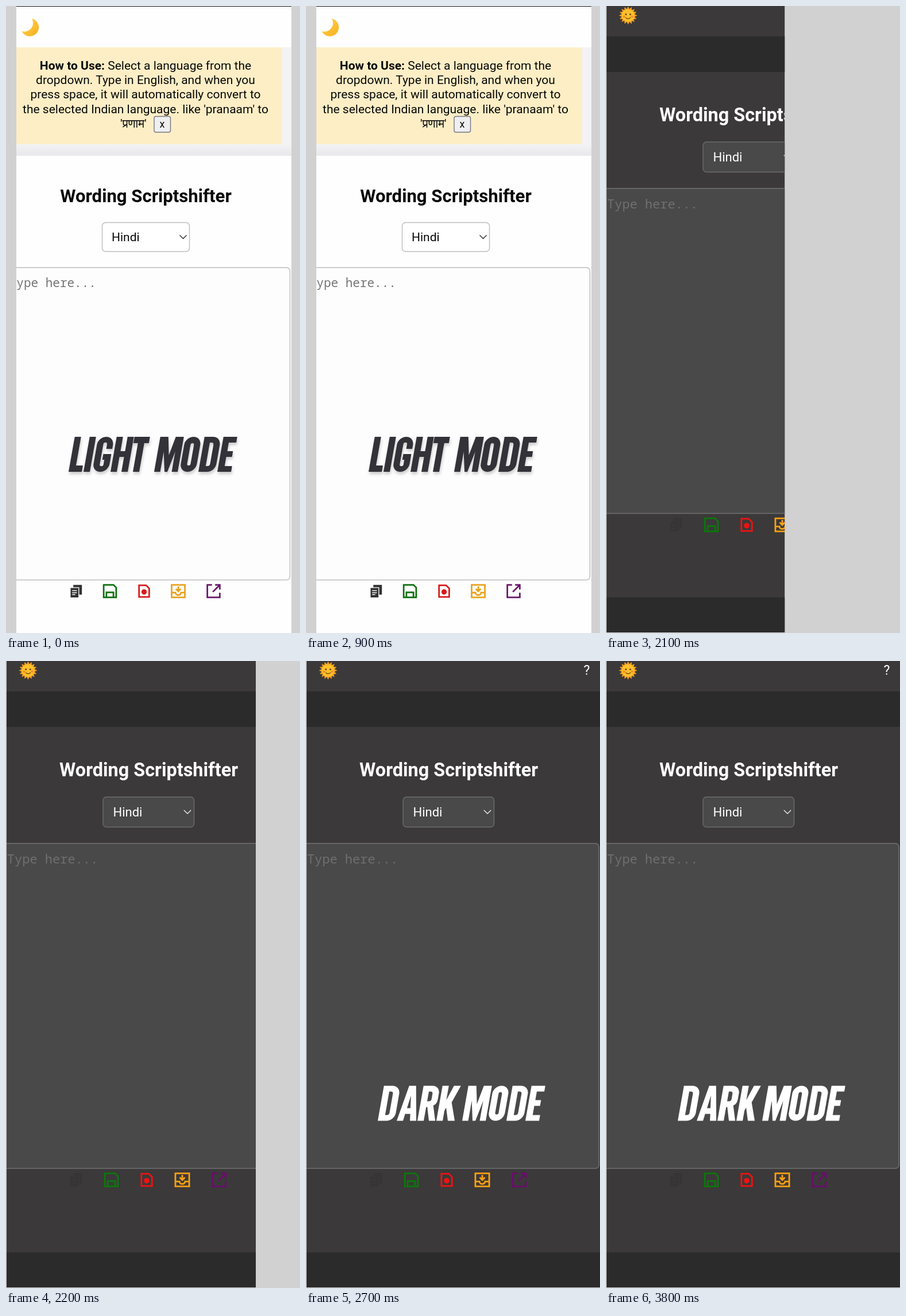
Write an HTML page that moves like this. It is 512 px wide and 1093 px high and loops after 4 s.

```html
<!DOCTYPE html>
<html lang="en">
<head>
<meta charset="utf-8">
<title>Light and dark mode</title>
<style>
html, body { margin: 0; width: 100%; height: 100%; overflow: hidden; background: #d1d1d1; }
svg { display: block; width: 100%; height: 100%; }
text { font-family: Roboto, "Noto Sans", sans-serif; }
.mono { font-family: "Noto Sans Mono", "DejaVu Sans Mono", monospace; }
.mid { text-anchor: middle; }
.bold { font-weight: 700; }
.line { fill: none; stroke: currentColor; stroke-width: 2; }
.arrow { fill: none; stroke-width: 1.3; }
</style>
</head>
<body>
<svg viewBox="0 0 512 1093" preserveAspectRatio="none">
<defs>
  <clipPath id="page"><rect x="18" width="479" height="1093"/></clipPath>
  <clipPath id="wipe"><rect id="wipeBox" height="1093"/></clipPath>
  <clipPath id="reveal"><rect id="revealBox" x="124" y="730" height="90"/></clipPath>
  <linearGradient id="fade" x2="0" y2="1">
    <stop stop-color="#f3f3f5"/><stop offset="1" stop-color="#e8e8ea"/>
  </linearGradient>
  <linearGradient id="gold" x2="1" y2="1">
    <stop stop-color="#ffd34d"/><stop offset="1" stop-color="#f9b021"/>
  </linearGradient>
  <filter id="soft" x="-10%" y="-20%" width="120%" height="150%">
    <feDropShadow dx="1" dy="4" stdDeviation="2.5" flood-color="#000" flood-opacity=".2"/>
  </filter>
  <g id="copy">
    <path d="M8.5 4H19.5V16.5H8.5z" fill="currentColor"/>
    <path d="M4.5 7.5H15.5V20.5H4.5z" fill="currentColor" stroke="var(--bg)"/>
    <path d="M7 11.5H13M7 14H13M7 16.5H11" stroke="var(--bg)" stroke-width="1.1"/>
  </g>
  <path id="save" class="line" d="M4 4H16.5L20 7.5V20H4zM7.5 20V13.5H16.5V20"/>
  <g id="file">
    <path class="line" d="M14.5 4.5H5.5V19.5H18.5V8.5z"/>
    <circle cx="12" cy="13" r="3.4" fill="currentColor"/>
  </g>
  <path id="inbox" class="line" d="M3.5 4H20.5V20H3.5zM3.5 14H8.5a3.5 3 0 0 0 7 0H20.5M12 6V12M8.8 9L12 12.2 15.2 9"/>
  <path id="open" class="line" d="M10 4H4V20H20V14M14 4H20V10M20 4L11 13"/>
</defs>

<rect width="512" height="1093" fill="#d1d1d1"/>

<g id="light" clip-path="url(#page)" style="--bg:#fefefe">
  <rect x="18" width="479" height="1093" fill="#fefefe"/>
  <rect x="18" width="479" height="1" fill="#111"/>
  <path d="M45 22A15.6 15.6 0 1 1 27.5 44A15 15 0 0 0 45 22z" fill="url(#gold)"/>
  <rect x="18" y="72" width="479" height="189" fill="#f3f3f5"/>
  <rect x="18" y="241" width="479" height="20" fill="url(#fade)"/>
  <rect x="18" y="72" width="463" height="169" fill="#fdeec6"/>
  <g font-size="21" fill="#080808">
    <g class="mid">
      <text x="243" y="111"><tspan class="bold">How to Use:</tspan> Select a language from the</text>
      <text x="243" y="136">dropdown. Type in English, and when you</text>
      <text x="243" y="161">press space, it will automatically convert to</text>
      <text x="243" y="186.500">the selected Indian language. like 'pranaam' to</text>
    </g>
    <text x="199" y="212">'प्रणाम'</text>
    <rect x="258" y="192.500" width="28.500" height="27.500" rx="3" fill="#efeff1" stroke="#777780" stroke-width="1.4"/>
    <text class="mid" x="272" y="212" font-size="18">x</text>
    <text class="mid bold" x="243.500" y="342" font-size="31.100">Wording Scriptshifter</text>
    <rect x="167.500" y="377.500" width="152" height="50.500" rx="6" fill="#fff" stroke="#bdbdbd" stroke-width="1.4"/>
    <text x="184" y="410">Hindi</text>
    <path class="arrow" d="M302.500 399.500L308.500 405.500 314.500 399.500" stroke="#222"/>
    <rect x="2" y="456" width="492.500" height="544.500" rx="6" fill="#fdfdfd" stroke="#bdbdbd" stroke-width="1.4"/>
    <text class="mono" x="5.700" y="490" fill="#757575">Type here...</text>
  </g>
</g>

<g id="dark" clip-path="url(#wipe)" style="--bg:#3b3939">
  <rect x="1" width="511" height="1092" fill="#3b3939"/>
  <path d="M1 53H512V115H1zM1 1031H512V1092H1z" fill="#2b2b2b"/>
  <g transform="translate(38.500 16.500)">
    <path id="rays" fill="#f8a01c"/>
    <circle r="10.800" fill="#ffc02b"/>
    <g fill="#6b4310"><circle cx="-3.800" cy="-2" r="1.500"/><circle cx="3.800" cy="-2" r="1.500"/></g>
    <path d="M-4.500 3.500Q0 8 4.500 3.500" fill="none" stroke="#8a5312" stroke-width="1.500"/>
    <g fill="#f58a2a"><circle cx="-7" cy="2" r="2"/><circle cx="7" cy="2" r="2"/></g>
  </g>
  <g font-size="22" fill="#fff">
    <text class="mid" x="489" y="24" font-size="23">?</text>
    <text class="mid bold" x="248.500" y="201" font-size="32.400">Wording Scriptshifter</text>
    <rect x="169" y="237" width="158.500" height="52.500" rx="6" fill="#494949" stroke="#6c6c6c" stroke-width="1.400"/>
    <text x="186.500" y="271">Hindi</text>
    <path class="arrow" d="M309.800 260L316 266 322.200 260" stroke="#eee"/>
    <path d="M1 318H504a6 6 0 0 1 6 6V878.500a6 6 0 0 1-6 6H1" fill="#494949" stroke="#727272" stroke-width="1.400"/>
    <text class="mono" x="1.800" y="353" fill="#6f6f6f">Type here...</text>
  </g>
</g>
</svg>
<script>
const NS = 'http://www.w3.org/2000/svg';
const $ = id => document.getElementById(id);

function add(parent, tag, attrs) {
  const el = document.createElementNS(NS, tag);
  for (const key in attrs) el.setAttribute(key, attrs[key]);
  return parent.appendChild(el);
}

// Condensed capitals, 61 units high: [advance, outline]
const glyphs = {
  L: [26, 'M0 0H11V50H23V61H0z'],
  I: [15, 'M0 0H11V61H0z'],
  G: [32, 'M28 21H17.500V13a3 3 0 0 0-6.500 0V48a3 3 0 0 0 6.500 0V40H14V30H28V47a14 14 0 0 1-28 0V14a14 14 0 0 1 28 0z'],
  H: [31, 'M0 0H11V25H19V0H30V61H19V35H11V61H0z'],
  T: [27, 'M0 0H27V11H19V61H8V11H0z'],
  M: [44, 'M0 61V0H14L20.500 32 27 0H41V61H30.500V26L23 61H18L10.500 26V61z'],
  O: [33, 'M0 14a14 14 0 0 1 28 0V47a14 14 0 0 1-28 0zM11 14V47a3 3 0 0 0 6 0V14a3 3 0 0 0-6 0z'],
  D: [33, 'M0 0H15a14 14 0 0 1 14 14V47a14 14 0 0 1-14 14H0zM11 10V51H14q4 0 4-4V14q0-4-4-4z'],
  E: [27, 'M0 0H24V10H11V25H21V35H11V51H24V61H0z'],
  A: [36, 'M0 61L11 0H23L34 61H23L21.500 49H12.500L11 61zM14 39H20L17 17z'],
  R: [33, 'M0 0H16a13 13 0 0 1 13 13V23q0 9-6 11.500L31 61H20L13 37H11V61H0zM11 10V27H14q4 0 4-4V14q0-4-4-4z'],
  K: [32, 'M0 0H11V25L20 0H32L21 29 32 61H20L13 38 11 43V61H0z']
};

function lettering(parent, words, y, attrs) {
  const g = add(parent, 'g', { role: 'img', 'aria-label': words.map(w => w[0]).join(' '), 'fill-rule': 'evenodd', ...attrs });
  for (const [word, start] of words) {
    let x = start;
    for (const c of word) {
      add(g, 'path', { d: glyphs[c][1], transform: `translate(${x} ${y}) skewX(-10) translate(0 -61)` });
      x += glyphs[c][0];
    }
  }
}

function icons(parent, xs, y, scale, colors) {
  ['copy', 'save', 'file', 'inbox', 'open'].forEach((id, i) => add(parent, 'use', {
    href: '#' + id, color: colors[i],
    transform: `translate(${xs[i]} ${y}) scale(${scale}) translate(-12 -12)`
  }));
}

icons($('light'), [122, 181, 240.5, 300, 361.5], 1020, 1.36, ['#333', '#0b6f0b', '#d81a1a', '#eaa11c', '#691669']);
icons($('dark'), [122, 183.5, 245, 307, 371.5], 904.5, 1.42, ['#363535', '#0a780a', '#f01212', '#fca012', '#6d0b70']);
lettering($('light'), [['LIGHT', 109], ['MODE', 258]], 812, { fill: '#303038', filter: 'url(#soft)' });
lettering($('dark'), [['DARK', 125], ['MODE', 272]], 801.5, { fill: '#fff', 'clip-path': 'url(#reveal)' });

const star = Array.from({ length: 32 }, (_, i) => {
  const r = i % 2 ? 11.5 : 16, a = i * Math.PI / 16;
  return `${(r * Math.sin(a)).toFixed(2)} ${(-r * Math.cos(a)).toFixed(2)}`;
});
$('rays').setAttribute('d', `M${star.join('L')}z`);

const easeOut = p => 1 - (1 - Math.min(1, Math.max(0, p))) ** 3;

function draw() {
  // The picture advances ten times a second
  const t = Math.floor(performance.now() % 4000 / 100) * 100;
  const isDark = t >= 2000;
  $('light').style.display = isDark ? 'none' : '';
  $('dark').style.display = isDark ? '' : 'none';
  $('wipeBox').setAttribute('width', 512 * easeOut((t - 1966) / 500));
  $('revealBox').setAttribute('width', 295 * easeOut((t - 2210) / 490));
  requestAnimationFrame(draw);
}
draw();
</script>
</body>
</html>
```
